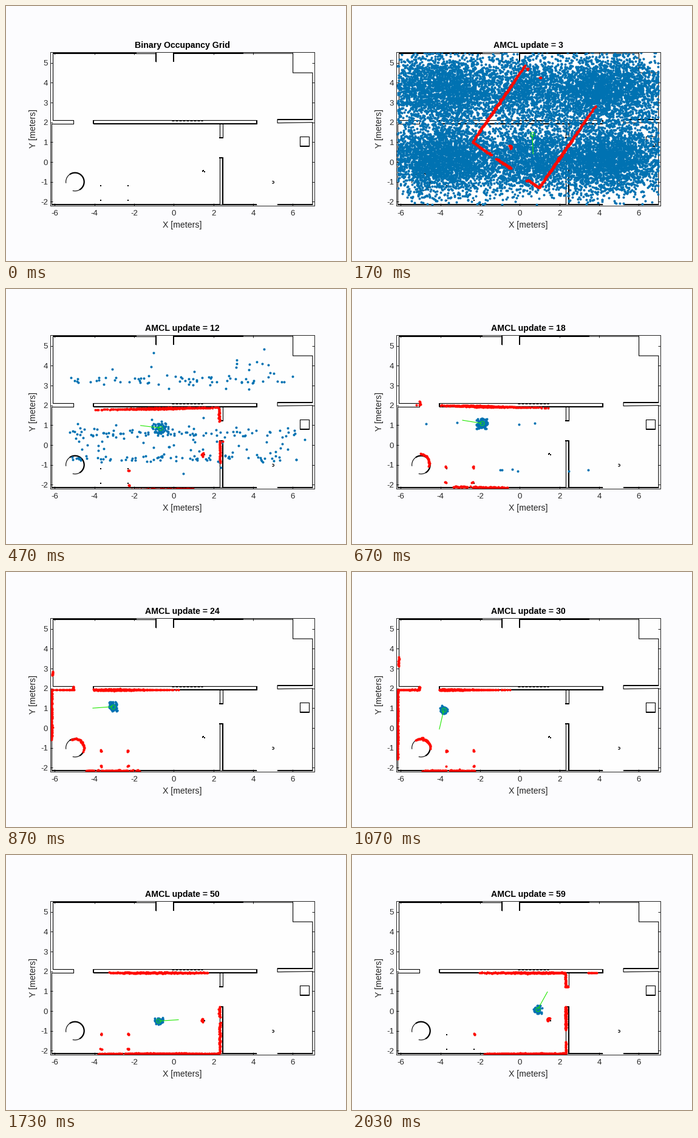
A matplotlib script for the animation above (2060 ms loop, 560 by 420 pixels).

```python
import numpy as np
import matplotlib.pyplot as plt
from matplotlib.animation import FuncAnimation

W, H = 560, 420
PX = 0.72              # points per pixel at 100 dpi
SCALE = 32.66          # pixels per metre
STEP, TICKS = 10, 206  # ms per tick, ticks per loop
RANGE = 3.5            # lidar reach in metres

plt.rcParams.update({"font.family": "Liberation Sans",
                     "axes.unicode_minus": False})


def box(x, y, w, h):
    return [(x, y), (x + w, y), (x + w, y + h), (x, y + h), (x, y)]


# Floor plan in metres
LEFT, RIGHT, TOP, LOW = -6.16, 7.0, 5.48, -2.15
MID, LINTEL = 1.93, 2.1
DOOR_L, DOOR_R, GATE = -5.06, 5.23, -0.91
OUTLINES = [
    [(GATE, 5.05), (GATE, TOP), (-6.1, TOP), (-6.1, LINTEL),
     (DOOR_L, LINTEL), (DOOR_L, MID), (LEFT, MID), (LEFT, LOW), (2.32, LOW)],
    [(0, 5.05), (0, TOP), (6.01, TOP), (6.01, 4.5), (RIGHT, 4.5),
     (RIGHT, 2.15), (DOOR_R, 2.15), (DOOR_R, 1.97), (RIGHT, 2),
     (RIGHT, LOW), (DOOR_R, LOW)],
    [(2.47, LOW), (4.19, LOW)],
    box(6.36, 0.8, 0.46, 0.48)[1:],
    box(-4.05, MID, 8.24, LINTEL - MID),
    box(2.31, 1.23, 0.15, MID - 1.23),
    box(2.32, LOW, 0.15, 0.21 - LOW),
]
SEGS = np.array([s for p in OUTLINES for s in zip(p, p[1:])])

# Heavier strokes: level, from, to
BOLD_H = [(TOP, -6.1, -1.88), (TOP, 0, 3.5), (MID, -4.05, 4.19),
          (LOW, LEFT, 2.32), (LOW, 2.47, 4.19), (LOW, DOOR_R, RIGHT),
          (2.15, DOOR_R, RIGHT), (0.8, 6.36, 6.84),
          (0.21, 2.28, 2.5), (1.23, 2.28, 2.48)]
BOLD_V = [(GATE, 5.05, 5.5), (0, 5.05, 5.5), (2.47, LOW, 0.21),
          (-4.05, MID, LINTEL), (4.19, MID, LINTEL)]

# Round obstacles: x, y, radius
DRUM = (-4.98, -1.0, 0.46)
POSTS = [(x, y) for x in (-3.68, -2.31) for y in (-1.18, -1.94)]
ROUND = np.array([DRUM, (1.5, -0.46, 0.09), (5.0, -1.02, 0.06)]
                 + [(x, y, 0.04) for x, y in POSTS])

# Robot route: update, x, y, heading in degrees
ROUTE = np.array([
    (1, 0, 0, 5), (3, 0.28, 0.11, 37), (7, 0.29, 0.64, 150),
    (18, -1.9, 1.07, 172), (26, -3.5, 1.05, 183), (30, -3.83, 0.92, 257),
    (41, -2.55, -0.46, 355), (55, 0.25, -0.38, 370), (59, 0.91, 0.09, 421)])

# Error of the estimate: update, dx, dy, rotation in degrees
DRIFT = np.array([
    (1, 0.5, 1.6, -60), (3, 0.35, 1.3, -124.5), (5, 0.1, 0.3, 20),
    (7, -0.02, -0.18, 3), (18, 0, 0.02, -1.3), (23, 0, 0, 0)])

# Stray hypotheses that survive longest, above and below the room's middle
STRAYS = np.array(
    [(x, 1.07) for x in (-0.07, 0.67, -3.16, -4.66)]
    + [(x, -1.26) for x in (-0.99, -0.87, -0.4, -0.1, 2.44, 3.46)])


def cross(a, b):
    return a[..., 0] * b[..., 1] - a[..., 1] * b[..., 0]


def turn(points, angle):
    c, s = np.cos(angle), np.sin(angle)
    return points @ np.array([[c, s], [-s, c]])


def pose(u):
    """True position and heading, cubic Hermite along the route."""
    i = min(max(np.searchsorted(ROUTE[:, 0], u) - 1, 0), len(ROUTE) - 2)
    a, b = ROUTE[i], ROUTE[i + 1]
    s = (u - a[0]) / (b[0] - a[0])
    p, q = a[1:3], b[1:3]
    ta, tb = np.radians([a[3], b[3]])
    reach = 1.1 * np.hypot(*(q - p))
    m = reach * np.array([np.cos(ta), np.sin(ta)])
    n = reach * np.array([np.cos(tb), np.sin(tb)])
    blend = s * s * (3 - 2 * s)
    pos = (p + blend * (q - p) + s * (1 - s)**2 * m - s * s * (1 - s) * n)
    vel = (6 * s * (1 - s) * (q - p) + (1 - s) * (1 - 3 * s) * m
           + s * (3 * s - 2) * n)
    return pos, np.arctan2(vel[1], vel[0])


def scan(pos, rng):
    """Lidar hits around pos, relative to it."""
    ang = np.radians(np.arange(0, 360, 0.5))
    d = np.stack([np.cos(ang), np.sin(ang)], 1)[:, None]
    w, e = SEGS[:, 0] - pos, SEGS[:, 1] - SEGS[:, 0]
    with np.errstate(all="ignore"):
        den = cross(d, e)
        t, s = cross(w, e) / den, cross(w, d) / den
        t = np.where((t > 0) & (s >= 0) & (s <= 1), t, np.inf)
        v = ROUND[:, :2] - pos
        b = (d * v).sum(2)
        c = b - np.sqrt(ROUND[:, 2]**2 - (v**2).sum(1) + b**2)
        c = np.where(c > 0, c, np.inf)
    r = np.minimum(t.min(1), c.min(1))
    hit = r < RANGE
    r = r[hit] + rng.normal(0, 0.018, hit.sum())
    return d[hit, 0] * r[:, None]


def spread(u, rng):
    """Hypotheses over the whole floor, tightening into bands."""
    n = int(np.interp(u, [1, 3, 5, 7, 10, 14],
                      [28000, 15000, 5000, 1750, 500, 60]))
    top = rng.random(n) < np.interp(u, [3, 7], [0.47, 0.27])
    loose = rng.random(n) < np.interp(u, [3, 7, 14], [1, 0.5, 0.2])
    sd = np.interp(u, [1, 3, 7], [2, 0.9, 0.68])
    edge = 0 if u < 4 else 0.8
    x = rng.uniform(LEFT + edge, RIGHT - edge, n)
    blob = rng.choice([-3.8, 0.5, 4.3], n, p=[0.4, 0.2, 0.4])
    pull = loose & (rng.random(n) < 0.5)
    x = np.where(pull, blob + rng.normal(0, 1.15, n), x)
    wide = np.where(top, 3.65, 0.15) + rng.normal(0, sd, n)
    band = np.where(top, 3.3, rng.choice([0.6, -0.67], n))
    y = np.where(loose, wide, band + rng.normal(0, 0.11, n))
    keep = (x > LEFT + edge / 2) & (x < RIGHT) & (y > LOW) & (y < 5.55)
    if u > 3:
        keep &= ((y < 1.4) | (y > 2.4)) & (y < 5)
    return np.stack([x, y], 1)[keep]


def cloud(u, est, rng):
    parts = []
    if u < 15:
        parts.append(spread(u, rng))
    elif u < 24:
        left = STRAYS[:len(STRAYS) - 2 * max(0, u - 18)]
        move = pose(u)[0] - pose(18)[0]
        parts.append(left + move * np.sign(left[:, 1:])
                     + rng.normal(0, 0.04, left.shape))
    if u > 7:
        n = int(np.interp(u, [8, 18, 30], [30, 105, 65]))
        sd = np.interp(u, [8, 18, 30], [0.25, 0.135, 0.1])
        parts.append(est + np.clip(rng.normal(0, 1, (n, 2)), -2, 2) * sd)
    return np.concatenate(parts)


fig = plt.figure(figsize=(5.6, 4.2), dpi=100, facecolor="#fcfcfe")
ax = fig.add_axes([72.5 / W, 1 - 328.5 / H, 435 / W, 253 / H],
                  facecolor="#fefefe")
x0, y0 = (72.5 - 276.3) / SCALE, (257 - 328.5) / SCALE
ax.set(xlim=(x0, x0 + 435 / SCALE), ylim=(y0, y0 + 253 / SCALE),
       xticks=range(-6, 7, 2), yticks=range(-2, 6))
INK = "#262626"
ax.tick_params(direction="in", length=4 * PX, width=PX, color=INK,
               labelcolor=INK, labelsize=13.2 * PX, top=True, right=True)
ax.tick_params(axis="x", pad=7.5 * PX)
ax.tick_params(axis="y", pad=3.5 * PX)
for spine in ax.spines.values():
    spine.set(color=INK, linewidth=PX)


def label(x, y, text, **kw):
    return fig.text(x / W, 1 - y / H, text, ha="center", va="baseline",
                    rotation_mode="anchor", fontsize=14.1 * PX, **kw)


label(290, 365, "X [meters]", color=INK)
label(49, 202, "Y [meters]", color=INK, rotation=90)
title = label(290, 69, "", color="black", weight="bold")


def trace(x, y, px, **kw):
    ax.plot(x, y, color="black", lw=px * PX, solid_capstyle="butt", **kw)


def arc(cx, cy, r, a, b, px):
    t = np.radians(np.linspace(a, b, 60))
    trace(cx + r * np.cos(t), cy + r * np.sin(t), px)


def marks(color, px, kind="o"):
    return ax.plot([], [], kind, color=color, ms=px * PX, mew=0)[0]


for pts in OUTLINES:
    trace(*zip(*pts), 1.1)
for y, a, b in BOLD_H:
    trace([a, b], [y, y], 2)
for x, a, b in BOLD_V:
    trace([x, x], [a, b], 2)
trace([-0.1, 1.45], [2.07, 2.07], 1, ls=(0, (4, 2)))
arc(*DRUM, -105, 188, 1.1)
arc(*DRUM, -60, 125, 2.2)
arc(5.0, -1.02, 0.055, -130, 130, 1.2)
marks("black", 2.4, "s").set_data(*zip(*POSTS))
marks("black", 2.6, "s").set_data([1.45, 1.54, 1.5], [-0.46, -0.49, -0.43])

dots = marks("#0072b2", 4)
beams = marks("#ff0a00", 4)
nose, = ax.plot([], [], color="#20e800", lw=1.1 * PX)
body, = ax.plot([], [], "o", mfc="none", mec="#20e800", ms=7 * PX,
                mew=0.9 * PX)
ARTISTS = [dots, beams, nose, body]


def draw(tick):
    step = int((tick + 0.5) * 0.3)   # 30 pictures per second
    for artist in ARTISTS:
        artist.set_visible(step > 0)
    if step == 0:
        title.set_text("Binary Occupancy Grid")
        return ARTISTS
    u = max(1, step - 2)
    title.set_text(f"AMCL update = {u}")
    rng = np.random.default_rng(u)
    pos, heading = pose(u)
    dx, dy, rot = (np.interp(u, DRIFT[:, 0], DRIFT[:, k]) for k in (1, 2, 3))
    est, rot = pos + (dx, dy), np.radians(rot)
    beams.set_data(*(est + turn(scan(pos, rng), rot)).T)
    dots.set_data(*cloud(u, est, rng).T)
    a = heading + rot
    nose.set_data([est[0], est[0] + np.cos(a)], [est[1], est[1] + np.sin(a)])
    body.set_data([est[0]], [est[1]])
    return ARTISTS


anim = FuncAnimation(fig, draw, frames=TICKS, interval=STEP, repeat=True,
                     repeat_delay=0, cache_frame_data=False)
plt.show()
```
